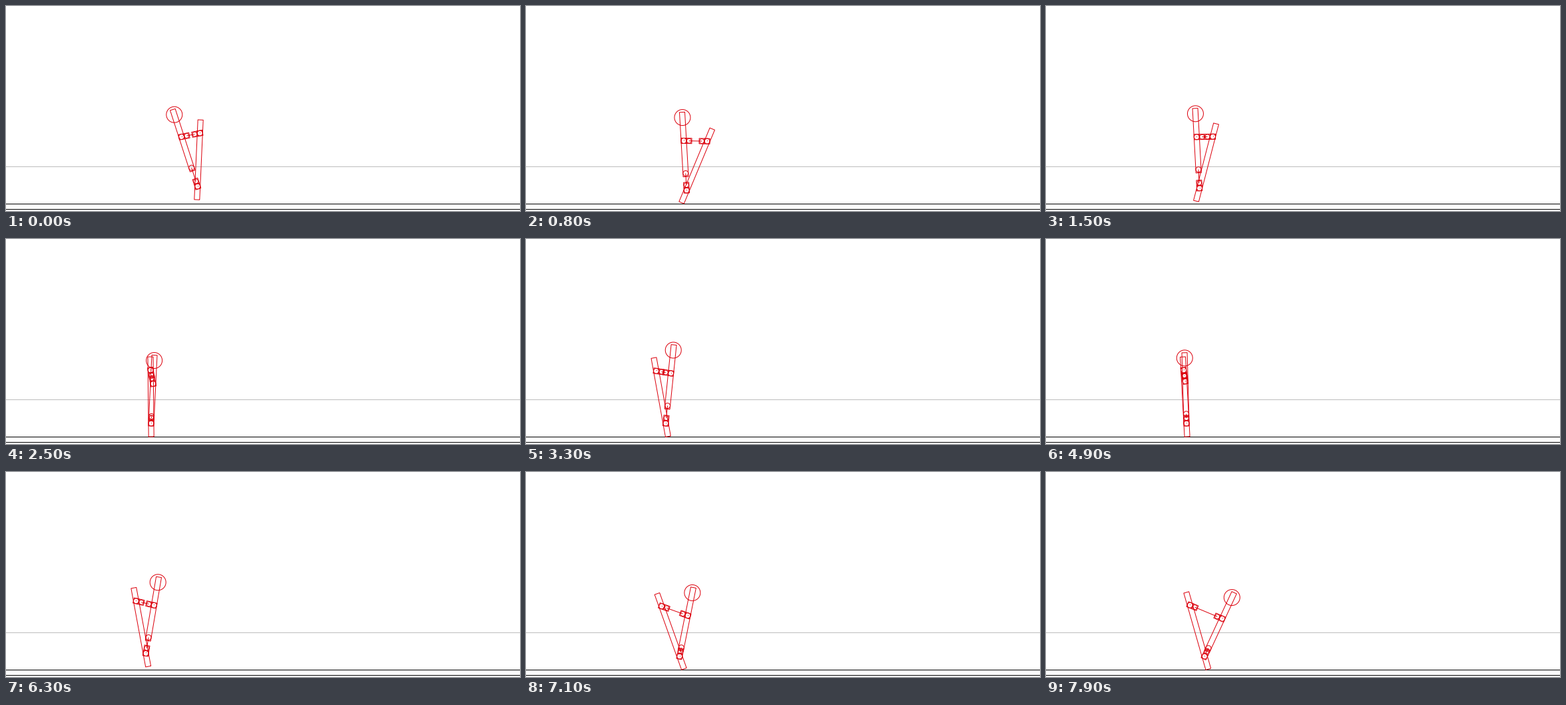
A matplotlib script for the animation above (8000 ms loop, 772 px wide and 308 px high).

```python
import numpy as np
import matplotlib.pyplot as plt
from matplotlib.animation import FuncAnimation
from matplotlib.collections import LineCollection

W, H, DPI = 772, 308, 100
FRAMES, STEP = 80, 100
PX = 72 / DPI
RED = "#dc000c"
GROUND = 276.5  # height of the foot joint while the leg stands

# turning points of the bounce: seconds, foot lift (+) or piston squeeze (-)
BEATS = np.array([
    (-0.6, -12), (0.36, 14), (1.05, -10), (1.75, 8.5), (2.45, -17),
    (3.1, 3), (3.77, -12), (4.45, 6), (4.95, -11.6), (5.55, 6),
    (5.95, -7), (6.45, 7.5), (7.35, -14), (9, 4),
])

# key poses: seconds, foot x, leg lean, body lean
POSES = np.array([
    (0, 287.2, 0.045, -0.313),
    (0.85, 239, 0.40, -0.05),
    (1.5, 230, 0.253, -0.054),
    (2.1, 218.5, 0.19, -0.09),
    (2.5, 217.5, -0.01, 0.049),
    (3.1, 211, -0.17, 0.09),
    (4.0, 205.4, -0.141, 0.122),
    (4.35, 204.5, -0.21, 0.08),
    (4.9, 210.5, -0.055, -0.028),
    (6.3, 209.5, -0.183, 0.169),
    (7.2, 232, -0.35, 0.215),
    (7.9, 237.8, -0.279, 0.434),
])
KEYS, VALUES = POSES[:, 0], POSES[:, 1:]
TANGENTS = np.gradient(VALUES, KEYS, axis=0)


def locate(times, t):
    i = min(np.searchsorted(times, t, side="right"), len(times) - 1) - 1
    h = times[i + 1] - times[i]
    return i, h, (t - times[i]) / h


def pose(t):
    i, h, u = locate(KEYS, t)
    chord = VALUES[i + 1] - VALUES[i]
    start, end = h * TANGENTS[i] - chord, h * TANGENTS[i + 1] - chord
    return VALUES[i] + u * chord + u * (1 - u) * ((1 - u) * start - u * end)


def bounce(t):
    i, _, u = locate(BEATS[:, 0], t)
    a, b = BEATS[i:i + 2, 1]
    return a + (b - a) * (1 - np.cos(np.pi * u)) / 2


def up(lean):
    return np.array([np.sin(lean), -np.cos(lean)])


def toward(p, q):
    return (q - p) / np.hypot(*(q - p))


def circle(c, r):
    a = np.linspace(0, 2 * np.pi, 41)
    return c + r * np.column_stack([np.cos(a), np.sin(a)])


def bar(p, q, width=8):
    d = toward(p, q)
    n = np.array([-d[1], d[0]]) * width / 2
    return np.array([p + n, q + n, q - n, p - n, p + n])


def block(c, d, r):
    return [bar(c - 4 * d, c + 4 * d), circle(c, r)]


def robot(t):
    x, leg_lean, body_lean = pose(t)
    level = bounce(t)
    piston = 29.3 - 0.8 * t + min(level, 0)
    foot = np.array([x, GROUND - max(level, 0)])

    leg, body = up(leg_lean), up(body_lean)
    waist = foot + piston * body
    top = waist + 92 * body
    hip, knee = top - 43 * body, foot + 80 * leg
    across = toward(hip, knee)
    hip_end, knee_end = hip + 8 * across, knee - 8 * across
    foot_end = foot + 8 * body

    lines = [
        bar(foot - 20 * leg, foot + 100 * leg),
        bar(waist - 5 * body, top),
        circle(top - 8 * body, 12),
        circle(waist, 4),
        np.array([hip_end, knee_end]),
        np.array([foot_end, waist]),
    ]
    for joint, end, d in ((hip, hip_end, across), (knee, knee_end, across),
                          (foot, foot_end, body)):
        lines += block(joint, d, 4) + block(end, d, 3.5)
    return lines, np.array([hip, knee, foot])


fig = plt.figure(figsize=(W / DPI, H / DPI), dpi=DPI, facecolor="white")
ax = fig.add_axes([0, 0, 1, 1])
ax.set_xlim(-0.5, W - 0.5)
ax.set_ylim(H - 0.5, -0.5)
ax.axis("off")

for y, color in ((241, "#bcbcbc"), (297, "black"), (305, "black")):
    ax.plot([-1, W], [y, y], color=color, lw=PX, zorder=1)

shape = LineCollection([], colors=RED, linewidths=PX, zorder=2)
ax.add_collection(shape, autolim=False)
dots, = ax.plot([], [], ",", color=RED, zorder=3)


def draw(n):
    lines, joints = robot(n * STEP / 1000)
    shape.set_segments(lines)
    dots.set_data(joints[:, 0], joints[:, 1])
    return shape, dots


anim = FuncAnimation(fig, draw, frames=FRAMES, interval=STEP,
                     repeat=True, repeat_delay=0)
plt.show()
```
